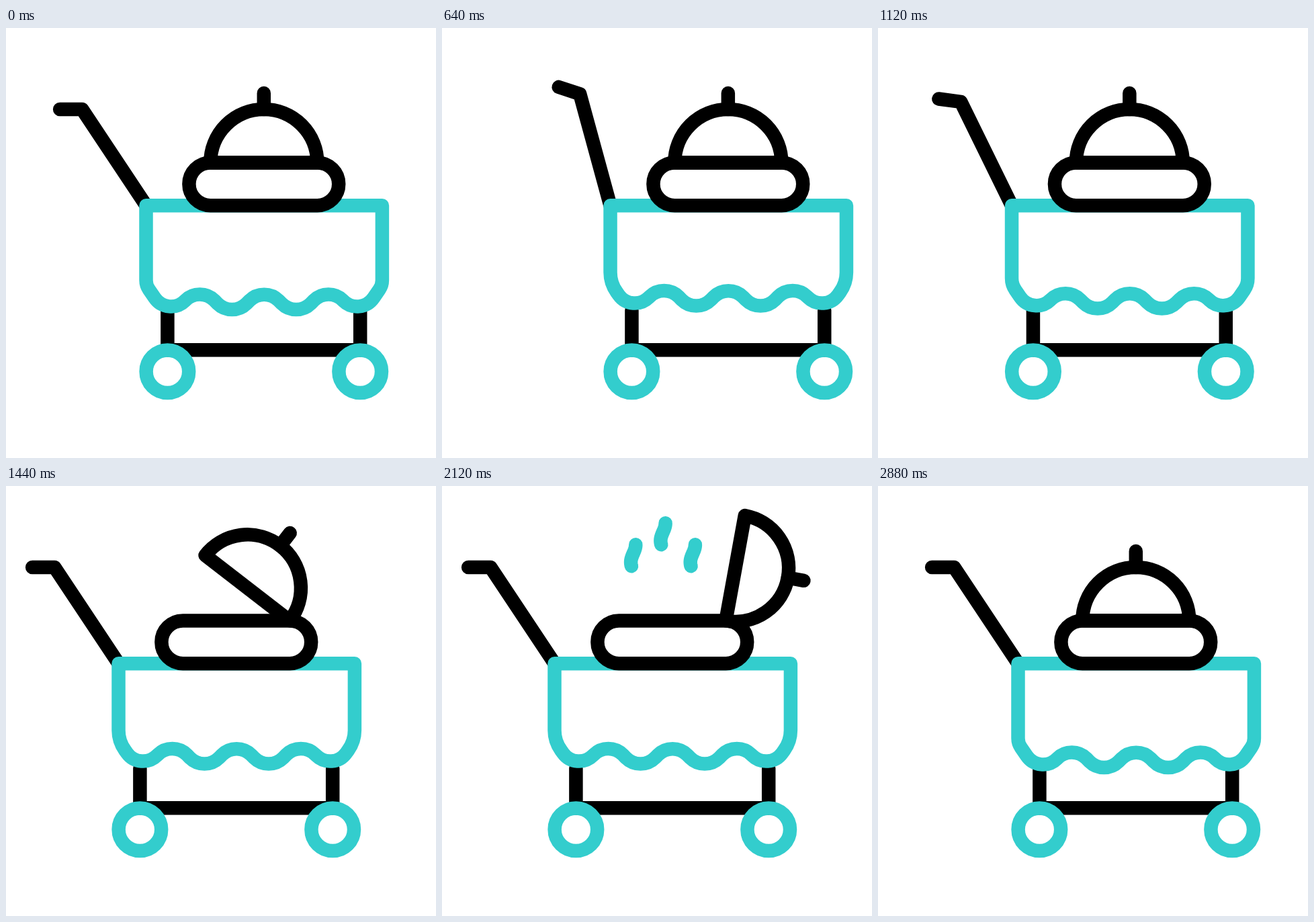
These frames come from a looping animation (640x640 px, 3 s). An HTML page with a canvas:

```html
<!DOCTYPE html>
<html lang="en">
<head>
<meta charset="utf-8">
<title>Serving cart</title>
<style>
  html, body { margin: 0; width: 100%; height: 100%; overflow: hidden; background: #fff; }
  canvas { display: block; width: 640px; height: 640px; }
</style>
</head>
<body>
<canvas id="stage" width="640" height="640"></canvas>
<script>
const ctx = document.getElementById('stage').getContext('2d');
const LOOP = 3000, STEP = 40;
const BLACK = '#000', TEAL = '#33cdcd';
const MID = 383.8, RIM = 264.2, TRAY_TOP = 200.5;
const CLOTH_MID = 384.2, CLOTH_HALF = 175.7;

function ease(t, from, to) {
  const s = Math.min(1, Math.max(0, (t - from) / (to - from)));
  return s * s * (3 - 2 * s);
}

// Rises from 0 to 1 between a and b, falls back between c and d.
function pulse(t, a, b, c, d) {
  return ease(t, a, b) - ease(t, c, d);
}

function stroke(color, build) {
  ctx.beginPath();
  build();
  ctx.strokeStyle = color;
  ctx.stroke();
}

function polyline(color, points) {
  stroke(color, () => points.forEach(([x, y]) => ctx.lineTo(x, y)));
}

function rotated(x, y, degrees, draw) {
  ctx.save();
  ctx.translate(x, y);
  ctx.rotate(degrees * Math.PI / 180);
  draw();
  ctx.restore();
}

function drawHandle(tilt) {
  rotated(CLOTH_MID - CLOTH_HALF, RIM, tilt, () =>
    polyline(BLACK, [[-128.4, -143.2], [-95.2, -143.2], [0, 0]]));
}

function drawFrame(wheelGap) {
  const left = MID - wheelGap, right = MID + wheelGap, floor = 479.3;
  polyline(BLACK, [[left, 420], [left, floor], [right, floor], [right, 420]]);
}

// The hem is a 45 degree zigzag with rounded corners.
function drawCloth(lift) {
  const rise = 5.5 * lift, pitch = 47.8;
  const side = [
    [-CLOTH_HALF, 383 - 3 * lift, 24 + 26 * lift],
    [-142.9, 430.8 - rise, 29.5]
  ];
  const corners = [...side];
  for (let i = -2; i <= 2; i++) {
    corners.push([i * pitch, 407.8 - rise + (i % 2 ? 0.5 : -0.5) * pitch, 30.8]);
  }
  side.reverse().forEach(([x, y, r]) => corners.push([-x, y, r]));

  ctx.save();
  ctx.translate(CLOTH_MID, 0);
  stroke(TEAL, () => {
    ctx.moveTo(-CLOTH_HALF, RIM);
    corners.forEach(([x, y, r], i) => {
      const [nextX, nextY] = corners[i + 1] || [CLOTH_HALF, RIM];
      ctx.arcTo(x, y, nextX, nextY, r);
    });
    ctx.lineTo(CLOTH_HALF, RIM);
    ctx.closePath();
  });
  ctx.restore();
}

function drawWheel(x) {
  stroke(TEAL, () => ctx.arc(x, 511.2, 31.8, 0, 2 * Math.PI));
}

function drawLid(angle) {
  const r = 79.5;
  rotated(MID + r, TRAY_TOP, angle, () => {
    stroke(BLACK, () => {
      ctx.arc(-r, 0, r, Math.PI, 0);
      ctx.closePath();
    });
    polyline(BLACK, [[-r, -r], [-r, -r - 24]]);
  });
}

function drawTray() {
  const r = (RIM - TRAY_TOP) / 2, half = 111.4;
  stroke(BLACK, () => ctx.roundRect(MID - half, TRAY_TOP, 2 * half, 2 * r, r));
}

// Visible part of a wavy wisp, from head (0 = top) to tail (1 = bottom).
function drawWisp(x, y, head, tail) {
  if (tail - head < 0.001) return;
  stroke(TEAL, () => {
    for (let i = 0; i <= 24; i++) {
      const v = head + (tail - head) * i / 24;
      ctx.lineTo(x - 3.6 * (1 - Math.cos(2.45 * Math.PI * v)), y + 64 * v);
    }
  });
}

function draw(t) {
  const push = pulse(t, 240, 760, 760, 1360) + pulse(t, 2200, 2560, 2560, 2880);
  const pull = pulse(t, 760, 1360, 2200, 2560);
  const lift = pulse(t, 280, 640, 640, 1000) + pulse(t, 1000, 1360, 2200, 2520);
  const open = pulse(t, 1270, 1700, 2000, 2685);
  const steamHead = 1 - ease(t, 1680, 2000), steamTail = 1 - ease(t, 2000, 2240);
  const wheelGap = 143.4;

  ctx.fillStyle = '#fff';
  ctx.fillRect(0, 0, 640, 640);
  ctx.lineWidth = 20.5;
  ctx.lineCap = ctx.lineJoin = 'round';

  ctx.save();
  ctx.translate(48.6 * push - 41 * pull, 0);
  drawHandle(21.2 * push);
  drawFrame(wheelGap);
  drawCloth(lift);
  drawWheel(MID - wheelGap);
  drawWheel(MID + wheelGap);
  drawLid(109.2 * open);
  drawTray();
  for (let i = -1; i <= 1; i++) {
    drawWisp(373.6 + 44.3 * i, 55.3 + 32 * Math.abs(i), steamHead, steamTail);
  }
  ctx.restore();
}

const start = performance.now();
function tick() {
  const t = (performance.now() - start) % LOOP;
  draw(Math.floor(t / STEP + 1e-6) * STEP);
  requestAnimationFrame(tick);
}
tick();
</script>
</body>
</html>
```
